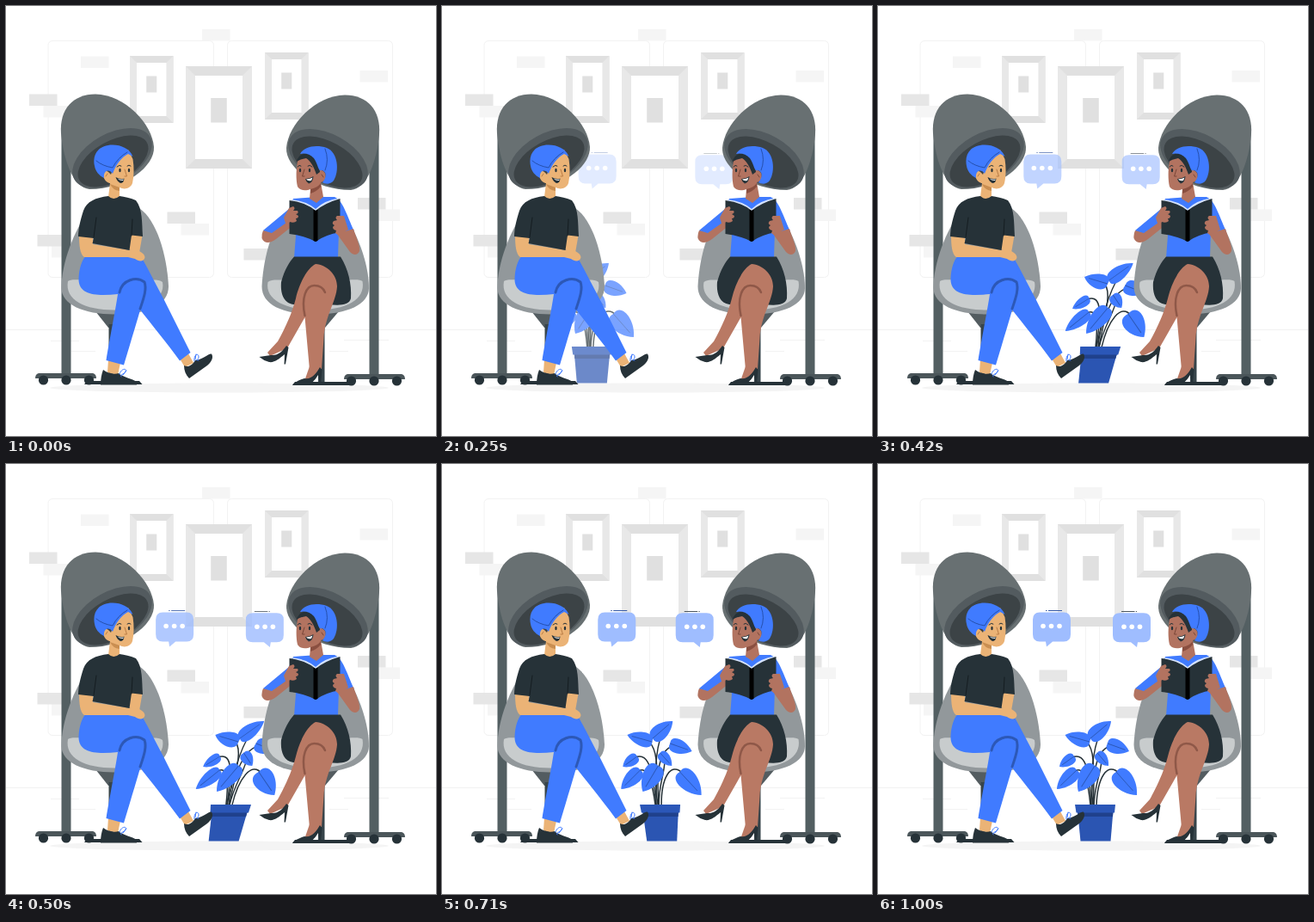
Animation of 500 by 500 pixels, one loop 1.04 s. Source, as an HTML page:

```html
<!DOCTYPE html>
<html lang="en">
<head>
<meta charset="utf-8">
<title>Salon chat</title>
<style>
html, body { margin: 0; width: 100%; height: 100%; overflow: hidden; background: #fff; }
svg { display: block; width: 500px; height: 500px; }
.blue { fill: #407bff; }
.ink { fill: #263238; }
.tan { fill: #ebb376; }
.brown { fill: #b27360; }
.leg { fill: #b97964; }
.line { fill: none; stroke-linecap: round; stroke-linejoin: round; }
</style>
</head>
<body>
<svg viewBox="0 0 500 500">
  <g id="wall">
    <g fill="none" stroke="#f2f2f2">
      <rect x="49" y="40.500" width="192.500" height="275" rx="5"/>
      <rect x="257.500" y="40.500" width="192" height="275" rx="5"/>
      <path d="M0 376.500H500M52 389.500H85M76 401.500H104M393 388.500H445M376 401.500H398"/>
    </g>
  </g>
  <ellipse cx="248" cy="444" rx="197" ry="5.500" fill="#f4f4f4"/>

  <g id="plant">
    <g class="line" stroke="#263238" stroke-width="1.500">
      <path d="M248 397C247 372 257 338 242 322"/>
      <path d="M250 397C247 372 248 334 259 311"/>
      <path d="M251 397C250 370 250 334 270 328"/>
      <path d="M251 397C252 372 258 365 260 345"/>
      <path d="M248 397C246 362 243 334 226 341"/>
      <path d="M247 397C245 374 240 348 228 358"/>
      <path d="M254 397C255 366 266 345 281 360"/>
    </g>
    <path d="M232 403H273.500L270.500 438.500H235.500Z" fill="#2b55b2"/>
    <path d="M232 404H273.500L273 410H232.600Z" fill="#20418c"/>
    <path d="M229 396H276L275 405.500H230.500Z" fill="#2b57b8"/>
  </g>

  <g id="bubbleL">
    <path d="M188 172.500H216Q224 172.500 224 181V198Q224 206.500 216 206.500H203L196 212.500L195 206.500H188Q180 206.500 180 198V181Q180 172.500 188 172.500Z" fill="#9fbdff"/>
    <g fill="#fff"><circle cx="192" cy="188.500" r="2.800"/><circle cx="201.500" cy="188.500" r="2.800"/><circle cx="211" cy="188.500" r="2.800"/></g>
    <path d="M195 170.500H196.500M198 170.500H214" stroke="#3458a5"/>
  </g>
  <g id="bubbleR">
    <path d="M281 173.300H309Q317 173.300 317 181V199Q317 207.300 309 207.300H302L301 213L294 207.300H281Q273 207.300 273 199V181Q273 173.300 281 173.300Z" fill="#9fbdff"/>
    <g fill="#fff"><circle cx="286" cy="189.300" r="2.800"/><circle cx="295.200" cy="189.300" r="2.800"/><circle cx="304.500" cy="189.300" r="2.800"/></g>
    <path d="M283 171.500H298.500M299.800 171.500H301" stroke="#4a5560"/>
  </g>

  <g id="dryer">
    <path d="M64.500 145H75.500V430H64.500Z" fill="#535f62"/>
    <path d="M38 427H101Q105 428 105 433H34Q34 428 38 427Z" fill="#4b565a"/>
    <g class="ink"><circle cx="43.500" cy="435" r="5.600"/><circle cx="70" cy="435" r="5.600"/><circle cx="96.500" cy="435" r="5.600"/></g>
    <path d="M64 148C62 120 78 102.500 104 102.500C138 103 170 137 172 164C173 186 140 213 97 213C78 211 67 180 64 148Z" fill="#687072"/>
    <ellipse cx="123.500" cy="177" rx="50.500" ry="28.500" transform="rotate(-29 123.500 177)" fill="#535b5f"/>
    <ellipse cx="124.500" cy="180.500" rx="45" ry="23.500" transform="rotate(-29 124.500 180.500)" fill="#3c4346"/>
  </g>
  <use href="#dryer" transform="translate(498 1) scale(-1 1)"/>

  <g id="stands">
    <path d="M104 355H150L125 374H119Z" fill="#535c60"/>
    <path d="M119.500 370H124.500V438H119.500Z" fill="#37444a"/>
    <path d="M94 436H155L158.500 440H91Z" class="ink"/>
    <path d="M342 355H387L371 374H365Z" fill="#535c60"/>
    <path d="M363 366H370.500V438H363Z" fill="#37444a"/>
    <path d="M336 437H400L403 441H333Z" class="ink"/>
  </g>
  <g id="chair">
    <path d="M96 238C79 262 64.500 298 64.500 328C64.500 347 90 358.500 126 358.500C166 358.500 189 347 189 326C187 288 175 249 155 235Z" fill="#92989b"/>
    <path d="M72 320C77 316 92 320 126 320C160 320 176 316 182 321C186 342 160 353.500 126 353.500C92 353.500 68 342 72 320Z" fill="#c8cccd"/>
  </g>
  <use href="#chair" transform="translate(486.500 0) scale(-1 1)"/>

  <g id="man">
    <path class="tan" d="M119 411L133 415L130 429L118 426ZM202 410L212 404L218 415L208 420Z"/>
    <path class="ink" d="M113 423C118 427 126 429 131 427C136 432 147 433 152 437V440.500H110C110 434 111 428 113 423ZM207 418C212 421 217 417 220 412C229 411 235 404 239 404.500C242 409 238 415 234 418L213 433C209 429 207 424 207 418Z"/>
    <path class="line" stroke="#407bff" d="M132 428C134 421 141 421 139 425S132 428 134 431M140 424L136 429M219 413C218 405 224 403 224 408S218 411 224 412M221 405L220 411"/>
    <path class="blue" d="M118 298L158 293C167 309 175 325 184 342L214.500 403L202 412.500C188 393 169 370 155 352L128 322Z"/>
    <path class="blue" d="M93 290H154C163 296 166 318 161 337C156 354 145 391 137 417.500L116.500 412C120 390 127 355 130 335C109 337 84 338 84.500 317C85 305 88 296 93 290Z"/>
    <path class="line" stroke="#2c58b7" stroke-width="3" d="M132 333C135 318 152 314 161 321C164 329 160 340 156 352"/>
    <path class="tan" d="M146 264L158.500 267L155 287L142 283Z"/>
    <path class="tan" d="M85 266L101 269L101 277L144 284C152 282 161 287 161.500 292C161 297 155 298 150 294L142 292H91C86 289 85 278 85 266Z"/>
    <path class="tan" d="M122 196C117 189 111 191 113 198C115 204 119 206 121 206L119 222L125 226L132 221L132 211C138 214 145 212 147 206C149 197 149 188 147.500 178L142 167L130 172Z"/>
    <path d="M121 207L132 211V215Q124 214 121 207Z" fill="#c98e51"/>
    <path class="ink" d="M119 221C104 223 94 227 90 238C86 250 84 260 84 268L102 270L100.500 276L143.500 284L146 266.500L159 268C158 252 159 236 151 226C144 223 138 222 132 221Q125 227 119 221Z"/>
    <path class="line" stroke="#151d21" d="M105 246L102 269M147 248L146 267"/>
    <path class="blue" d="M103 186C100 171 109 161.500 124 161.500C134 161.500 144 166 147.500 175L142 172C134 176 128 184 124 195C120 189 113 191 114 200C108 197 104 192 103 186Z"/>
    <path class="line" stroke="#2550ad" d="M105 180Q112 186 124 188C128 180 134 174 141 170"/>
    <g class="ink"><ellipse cx="132.500" cy="191" rx="1.200" ry="2.200"/><ellipse cx="143" cy="191" rx="1.200" ry="2.200"/></g>
    <path class="line" stroke="#263238" d="M129 187Q132 184 134 186M141 186Q143 184 145 186"/>
    <path class="line" stroke="#b97c45" d="M138 190L140.500 198H138M118 195L116 198"/>
    <path class="ink" d="M127.500 199Q133 202 137.500 200.500Q137 206 133 206Q129 204 127.500 199Z"/>
    <path d="M129.500 200.500Q134 202.500 137 201.500L136 203Q132 203 129.500 200.500Z" fill="#fff"/>
  </g>

  <g id="woman">
    <path class="blue" d="M334 224L362 222L382 222C392 226 396 243 405 262L394 270L387 260L386 293H335L337 267L331 255L309 271L299 261L329 236Z"/>
    <path class="brown" d="M299 261L309 264L333 247L339 251L314 271C306 277 300 276 297.500 270Q297 265 299 261ZM394 262L404 259C407 269 412 279 411 285C409 290 404 290 400 286L382 261L391 251Z"/>
    <path class="ink" d="M335 291.500H389C398 306 402 323 401 340C399 349 386 348 374 347L334 347C322 345 319 333 320 321C324 306 330 297 335 291.500Z"/>
    <path class="leg" d="M360 300C373 301 385 312 385 326C384 344 371 360 369.500 386L367 422L353 423L347.500 362L327 398L307 407L304 403L316 390C325 374 333 356 337 340C341 323 350 305 360 300Z"/>
    <path class="line" stroke="#8f5848" stroke-width="2.500" d="M347.500 360C343 339 349 325 358.500 325C364 325 369 328 371 333"/>
    <path class="leg" d="M353 419H367L360 433L347 436Z"/>
    <path class="ink" d="M294.500 408Q301 407 308 406C316 407 322 401 326 395L328.500 397L325 416.500H323.500L324 405C318 410 312 415 306 414Q299 412 294.500 408ZM333.500 440Q339 435 347 433C355 435 361 427 365 420L367.500 423L366 438H364.500L363 429Q357 439 350 441H334Z"/>
    <path class="brown" d="M340 176C337 188 337 202 339 210C342 215 349 215 354 213L353 224L361 229L369 222L366 205C373 204 374 193 367 191L358 174Z"/>
    <path d="M354 213Q363 211 366 206L366 210Q361 216 354 218Z" fill="#8a4f40"/>
    <path class="ink" d="M338 181C339 174 346 170 353 172C361 176 364 184 365 193L361 196C358 187 354 180 349 177Q342 178 338 181Z"/>
    <path class="blue" d="M342 172C347 163 361 161 373 165C386 170 388 192 381 203C377 208 371 207 368 205C374 198 372 192 367 191C363 193 363 184 358 177Q351 170 342 172Z"/>
    <path class="line" stroke="#2550ad" d="M371 166Q376 179 371 191"/>
    <g class="ink"><ellipse cx="342" cy="191" rx="1.200" ry="2.200"/><ellipse cx="353" cy="191" rx="1.200" ry="2.200"/></g>
    <path class="line" stroke="#263238" d="M339 187Q341 184 343 186M351 186Q353 184 356 187"/>
    <path class="line" stroke="#7a4638" d="M347 190L344.500 198H347M367 196L369 199"/>
    <path class="ink" d="M348 201Q353 201 357.500 198Q357 205 352 206.500Q349 205 348 201Z"/>
    <path d="M349 201.500Q354 201 356.500 199.500L355 203Q351 204 349 201.500Z" fill="#fff"/>
    <path d="M332 225Q350 227 360 236Q370 226 387 223.500V229L360 242L332 231Z" fill="#d5e3ff"/>
    <path class="ink" d="M329.500 226Q348 228 360 238Q371 229 388.500 224V263Q371 266 360 274Q347 267 329.500 265Z"/>
    <path d="M357.500 236.500L360 238L362.500 236.500V273L360 274L357.500 273Z" fill="#000"/>
    <path class="brown" d="M323 246L329 235L334 233Q337 235 334 238L339 238Q341 241 337 242L340 244Q340 247 337 247L338 250Q335 253 330 251L326 256ZM393 244L385 244Q382 246 385 249L381 250Q378 253 382 255L380 257Q380 260 384 261L383 264Q387 268 391 264L398 260Z"/>
  </g>
</svg>
<script>
const NS = "http://www.w3.org/2000/svg";
const $ = id => document.getElementById(id);

function add(parent, tag, attrs) {
  const el = document.createElementNS(NS, tag);
  for (const k in attrs) el.setAttribute(k, attrs[k]);
  return parent.appendChild(el);
}

// Bricks come in dark and light tones, all the same size.
function bricks(fill, spots) {
  for (const [x, y] of spots) add($("wall"), "rect", { x, y, width: 32.5, height: 13.5, fill });
}
bricks("#f5f5f5", [[228, 27], [87, 58.5], [411.5, 75], [43.5, 116], [203.5, 253], [425.5, 236.5], [53, 279]]);
bricks("#e6e6e6", [[27, 102.5], [187.5, 239.5], [409, 223], [36.5, 266], [276.5, 282]]);

function picture(x, y, w, h, b, cw, ch) {
  const g = add($("wall"), "g", {});
  const r = x + w, d = y + h;
  add(g, "rect", { x, y, width: w, height: h, fill: "#e0e0e0" });
  add(g, "path", { d: `M${x} ${y}l${b} ${b}V${d - b}L${x} ${d}Z`, fill: "#e8e8e8" });
  add(g, "path", { d: `M${r} ${y}l${-b} ${b}V${d - b}L${r} ${d}Z`, fill: "#e8e8e8" });
  add(g, "rect", { x: x + b, y: y + b, width: w - 2 * b, height: h - 2 * b, fill: "#fff" });
  add(g, "rect", { x: x + (w - cw) / 2, y: y + (h - ch) / 2 - b * .75, width: cw, height: ch, fill: "#e0e0e0" });
}
picture(144, 58, 50.5, 78, 8, 12, 19);
picture(209, 70, 77, 119, 11, 18.5, 28.5);
picture(301, 54, 50.5, 78, 8, 12, 19);

// A leaf runs from its rounded base to a pointed tip, w wide.
function leaf(x, y, tx, ty, w) {
  const len = Math.hypot(tx - x, ty - y);
  const turn = Math.atan2(ty - y, tx - x) * 180 / Math.PI;
  const g = add($("plant"), "g", { transform: `translate(${x} ${y}) rotate(${turn})` });
  const c = len * .12, m = len * .6, h = w * .67;
  add(g, "path", { class: "blue", d: `M0 0C${-c} ${-h} ${m} ${-h} ${len} 0C${m} ${h} ${-c} ${h} 0 0Z` });
  add(g, "path", { d: `M0 0H${len * .8}`, class: "line", stroke: "#2c58b7", "stroke-width": .9 });
}
leaf(246, 323, 217.5, 315, 17);
leaf(247, 319, 271, 299, 18);
leaf(267, 325, 292, 334, 17);
leaf(255, 336, 268, 351, 13);
leaf(228, 340, 211, 352, 13);
leaf(231, 356, 208, 378, 17);
leaf(252, 351, 233, 381, 22);
leaf(277, 358, 301, 385, 23);

// cubic-bezier(.36, -.01, .5, 1.38)
const cubic = (a, b, t) => 3 * (1 - t) * (1 - t) * t * a + 3 * (1 - t) * t * t * b + t * t * t;
function ease(x) {
  if (x <= 0) return 0;
  if (x >= 1) return 1;
  let lo = 0, hi = 1;
  for (let i = 0; i < 24; i++) {
    const mid = (lo + hi) / 2;
    if (cubic(.36, .5, mid) < x) lo = mid; else hi = mid;
  }
  return cubic(-.01, 1.38, lo);
}
const clamp = v => Math.max(0, Math.min(1, v));

function place(el, transform, opacity) {
  el.setAttribute("transform", transform);
  el.setAttribute("opacity", clamp(opacity));
}

function movePlant(u) {
  const e = ease(u / .6);
  let skew, shift = 0;
  if (u < .6) {
    skew = 20 - 30 * e;
    shift = -250 * (1 - e);
  } else if (u < .8) {
    skew = -10 + 12 * ease((u - .6) / .2);
  } else {
    skew = 2 - 2 * ease((u - .8) / .2);
  }
  place($("plant"), `translate(${shift} 369) skewX(${skew}) translate(0 -369)`, e);
}

const LOOP = 1040, FPS = 24;
function draw(ms) {
  const step = Math.min(24, Math.floor((ms % LOOP + 4) * FPS / 1000));
  const u = step ? Math.min(1, step / FPS + .033) : 0;
  const e = ease(u), off = 30 * (1 - e);
  place($("bubbleL"), `translate(${-off} 0)`, e);
  place($("bubbleR"), `translate(${off} 0)`, e);
  movePlant(u);
}

const start = performance.now();
function tick() {
  draw(performance.now() - start);
  requestAnimationFrame(tick);
}
tick();
</script>
</body>
</html>
```
